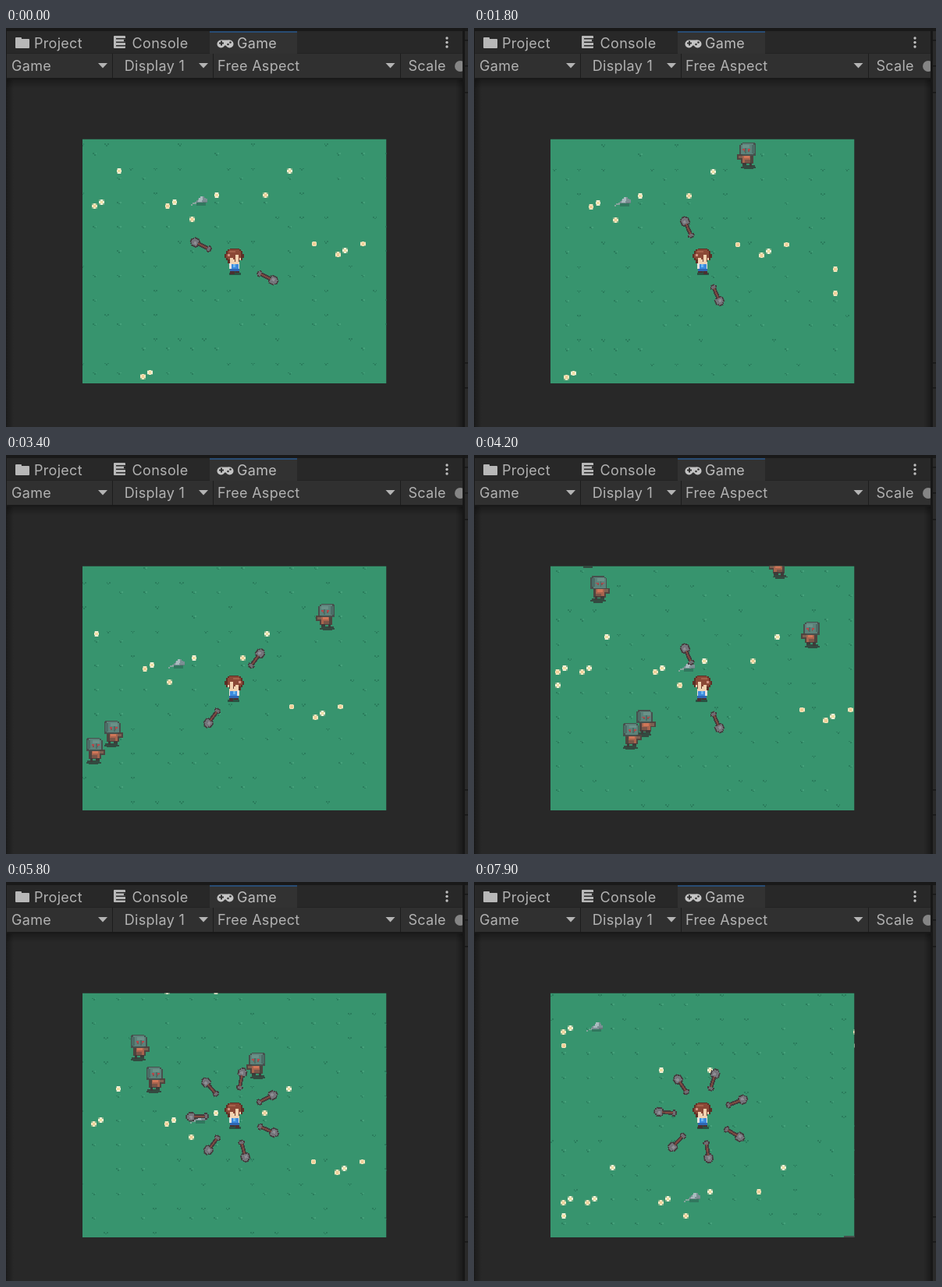
Animation, 592 px wide and 512 px high, one loop 8 s. Source, as an HTML page with a canvas:

```html
<!DOCTYPE html>
<html lang="en">
<head>
<meta charset="utf-8">
<title>Game view</title>
<style>
html, body { margin: 0; width: 100%; height: 100%; overflow: hidden; background: #282828; }
canvas { display: block; }
</style>
</head>
<body>
<canvas id="stage" width="592" height="512"></canvas>
<script>
const ctx = document.getElementById('stage').getContext('2d');
const LOOP = 8000, STEP = 100;
const TILE = 31.25, PX = TILE / 18;
const VIEW = { x: 98, y: 142.5, w: 389.5, h: 313.5 };
const HERO = { x: 292.5, y: 300 };

// Offset of the ground on screen: time, x, y
const walk = [[0, 0, 0], [900, 0, 1], [1800, -57, 1], [3400, -29, 46], [4900, 72.5, 53.5],
  [5800, -1, 82], [6600, 31, 138], [7900, 32.5, 183]];

// Enemy paths in ground coordinates: time, x, y
const enemies = [
  [[600, 437, 116], [1800, 407, 163], [2900, 378, 206]],
  [[1800, 489, 106], [3400, 439, 162], [4900, 378.5, 197.5], [5400, 360, 210]],
  [[1800, 93, 327], [3400, 166, 312], [4300, 198, 292]],
  [[1800, 71, 355], [3400, 143, 334], [4750, 200, 295]],
  [[3400, 97, 50], [4900, 144.5, 101.5], [5800, 172, 131], [6400, 197, 145]],
  [[3400, 106, 97], [4900, 161.5, 144.5], [5800, 192, 172], [6250, 207, 180]],
  [[3400, 387, 61], [4900, 346.5, 118.5], [5800, 322, 154], [6000, 317, 162]],
  [[7600, 460, 298], [7900, 447.5, 288.5]]
];

const singles = ['4,5', '11,5', '8,6', '10,6', '7,7', '12,8', '14,8', '6,1', '8,1', '16,9', '16,10'];
const pairs = ['3,7', '6,7', '13,9', '5,14'];
const triples = ['2,7', '2,0', '14,0'];
const rocks = ['7,6', '3,-1'];

function along(keys, t) {
  let i = 1;
  while (i < keys.length - 1 && t > keys[i][0]) i++;
  const [t0, x0, y0] = keys[i - 1], [t1, x1, y1] = keys[i];
  const k = Math.min(1, Math.max(0, (t - t0) / (t1 - t0)));
  return { x: x0 + (x1 - x0) * k, y: y0 + (y1 - y0) * k };
}

function sprite(w, h, paint) {
  const c = document.createElement('canvas');
  c.width = w;
  c.height = h;
  const g = c.getContext('2d');
  paint((color, x, y, rw, rh) => {
    g.fillStyle = color;
    g.fillRect(x, y, rw, rh);
  });
  return c;
}

function stamp(img, x, y, flip = false, angle = 0) {
  ctx.save();
  ctx.translate(x, y);
  ctx.rotate(angle);
  ctx.scale(flip ? -PX : PX, PX);
  ctx.drawImage(img, -img.width / 2, -img.height / 2);
  ctx.restore();
}

const hero = [0, 1].map(step => sprite(14, 20, r => {
  const dark = '#5c2f26', hair = '#8b4836', skin = '#f2d2b0';
  r('rgba(38,66,56,.8)', 3, 18, 9, 2);
  r('rgba(38,66,56,.8)', 4, 17, 7, 1);
  r(dark, 4, 0, 7, 1);
  r(dark, 2, 1, 10, 1);
  r(dark, 1, 2, 12, 2);
  r(dark, 0, 4, 14, 3);
  r(dark, 1, 7, 12, 2);
  r(dark, 2, 9, 2, 2);
  r(hair, 3, 1, 8, 1);
  r(hair, 2, 2, 10, 2);
  r(hair, 1, 4, 11, 3);
  r(hair, 2, 7, 3, 1);
  r('#a5604a', 3, 2, 5, 1);
  r('#d08f80', 2, 4, 2, 2);
  r(skin, 4, 7, 8, 2);
  r(skin, 4, 9, 7, 3);
  r(skin, 8, 5, 2, 2);
  r(hair, 6, 6, 2, 2);
  r(hair, 10, 6, 1, 2);
  r('#6b3c33', 7, 8, 1, 2);
  r('#6b3c33', 10, 8, 1, 2);
  r('#e9e2de', 3, 11, 2, 4);
  r('#e9e2de', 10, 11, 1, 4);
  r('#3c8ade', 5, 12, 5, 5);
  r('#6cb6f0', 6, 12, 2, 2);
  r('#2f67b4', 4, 15, 7, 2);
  r('#4b3032', 4, 17, 3, step ? 1 : 2);
  r('#4b3032', 8, 17, 3, step ? 2 : 1);
}));

const zombie = [0, 1].map(step => sprite(15, 20, r => {
  const edge = '#46504d', skin = '#5c827a';
  r('rgba(52,66,59,.9)', 4, 17, 9, 1);
  r('rgba(52,66,59,.9)', 3, 18, 11, 1);
  r('rgba(52,66,59,.9)', 5, 19, 7, 1);
  r(edge, 4, 0, 9, 1);
  r(edge, 3, 1, 11, 1);
  r(edge, 2, 2, 12, 7);
  r(edge, 3, 9, 11, 1);
  r(skin, 4, 1, 8, 1);
  r(skin, 3, 2, 9, 7);
  r('#6a9188', 4, 2, 5, 2);
  r('#4b6d66', 11, 2, 2, 6);
  r('#4b6d66', 6, 4, 1, 4);
  r('#b8474a', 4, 5, 2, 1);
  r('#b8474a', 8, 5, 2, 1);
  r('#8b4f4c', 5, 6, 1, 1);
  r('#8b4f4c', 8, 6, 1, 1);
  r('#4f443f', 3, 10, 9, 6);
  r('#4f443f', 0, 8 + step, 4, 4);
  r('#7d6152', 1, 9 + step, 4, 2);
  r('#a8644e', 4, 10, 6, 5);
  r('#cf7658', 5, 10, 4, 2);
  r('#7b5548', 6, 13, 4, 2);
  r('#3d3b39', 4, 15, 3, step ? 2 : 3);
  r('#3d3b39', 9, 15, 2, step ? 3 : 2);
}));

const shovel = sprite(17, 7, r => {
  const edge = '#443c3e';
  r(edge, 0, 2, 3, 3);
  r(edge, 1, 1, 2, 5);
  r(edge, 3, 2, 8, 3);
  r(edge, 10, 1, 6, 5);
  r(edge, 11, 0, 4, 7);
  r(edge, 16, 2, 1, 3);
  r('#716d72', 1, 2, 2, 3);
  r('#82493f', 3, 3, 8, 1);
  r('#74747a', 11, 1, 4, 5);
  r('#74747a', 15, 2, 1, 3);
  r('#8e8e94', 12, 2, 2, 2);
});

const flower = [['#f3e6bf', '#f0cf98'], ['#f0f0d8', '#f0dfa4']].map(([petal, heart]) => sprite(4, 4, r => {
  r('#7fae86', 0, 0, 4, 4);
  r(petal, 0, 1, 4, 2);
  r(petal, 1, 0, 2, 4);
  r(heart, 1, 1, 2, 2);
}));

const rock = sprite(12, 8, r => {
  r('#31775e', 4, 6, 7, 2);
  r('#86a39c', 0, 7, 1, 1);
  r('#86a39c', 1, 6, 3, 1);
  r('#86a39c', 3, 5, 2, 1);
  r('#7a8f93', 4, 4, 8, 2);
  r('#7a8f93', 5, 3, 7, 1);
  r('#7a8f93', 6, 2, 5, 1);
  r('#7a8f93', 7, 1, 3, 1);
  r('#a9bbbe', 5, 4, 3, 1);
  r('#a9bbbe', 6, 2, 3, 2);
  r('#a9bbbe', 7, 1, 2, 1);
  r('#64777b', 9, 5, 3, 1);
});

const blades = ['#46a17b', '#2b7d5d'].map(tip => sprite(3, 2, r => {
  r('#2b7d5d', 0, 0, 1, 1);
  r('#2b7d5d', 1, 1, 1, 1);
  r(tip, 2, 0, 1, 1);
}));

function hash(i, j) {
  const v = Math.sin(i * 127.1 + j * 311.7) * 43758.5453;
  return v - Math.floor(v);
}

function drawTile(i, j, off) {
  const x = i * TILE + off.x, y = j * TILE + off.y, key = i + ',' + j;
  const triple = triples.includes(key), pair = triple || pairs.includes(key);
  const single = triple || singles.includes(key);
  if (single) stamp(flower[hash(j, i) > 0.5 ? 1 : 0], x + 20, y + 27);
  if (pair) {
    stamp(flower[1], x + 28.5, y + 4.5);
    stamp(flower[0], x + 19.5, y + 9.7);
  }
  if (rocks.includes(key)) stamp(rock, x + 28.5, y + 33.5);
  else if (!single && !pair) {
    if (hash(i, j) < 0.42) stamp(blades[1], x + 4, y + 25);
    else stamp(blades[0], x + 20, y + 5.75);
  }
}

function drawGround(off) {
  ctx.fillStyle = '#37946e';
  ctx.fillRect(VIEW.x, VIEW.y, VIEW.w, VIEW.h);
  const i0 = Math.floor((VIEW.x - off.x) / TILE) - 1, j0 = Math.floor((VIEW.y - off.y) / TILE) - 2;
  for (let j = j0; j < j0 + 14; j++)
    for (let i = i0; i < i0 + 16; i++) drawTile(i, j, off);
}

function spin(t) {
  const deg = t < 1800 ? 26 + t * 0.12256 : 246.6 + (t - 1800) * 0.15;
  return deg * Math.PI / 180;
}

function drawGame(t) {
  const off = along(walk, t);
  const step = Math.floor(t / 200) % 2;
  ctx.save();
  ctx.beginPath();
  ctx.rect(VIEW.x, VIEW.y, VIEW.w, VIEW.h);
  ctx.clip();
  ctx.imageSmoothingEnabled = false;
  drawGround(off);
  for (const path of enemies) {
    if (t < path[0][0] || t > path[path.length - 1][0]) continue;
    const p = along(path, t);
    const x = p.x + off.x;
    stamp(zombie[step], x, p.y + off.y, x < HERO.x);
  }
  const left = (t > 1850 && t < 4850) || (t > 5850 && t < 6750);
  const moving = t >= 900 && t < 7100;
  stamp(hero[moving ? step : 0], HERO.x, HERO.y, left);
  const count = t < 5350 ? 2 : 7;
  for (let n = 0; n < count; n++) {
    const a = spin(t) + n * 2 * Math.PI / count;
    stamp(shovel, HERO.x + 47.5 * Math.cos(a), HERO.y - 0.7 + 47.5 * Math.sin(a), false, a);
  }
  ctx.restore();
}

function box(color, x, y, w, h) {
  ctx.fillStyle = color;
  ctx.fillRect(x, y, w, h);
}

function round(color, x, y, w, h, r) {
  ctx.fillStyle = color;
  ctx.beginPath();
  ctx.roundRect(x, y, w, h, r);
  ctx.fill();
}

function dot(color, x, y, r) {
  ctx.fillStyle = color;
  ctx.beginPath();
  ctx.arc(x, y, r, 0, 7);
  ctx.fill();
}

function label(text, x, y, color = '#b2b2b2') {
  ctx.fillStyle = color;
  ctx.fillText(text, x, y);
}

function arrow(x) {
  ctx.fillStyle = '#b4b4b4';
  ctx.beginPath();
  ctx.moveTo(x - 6, 45);
  ctx.lineTo(x + 6, 45);
  ctx.lineTo(x, 51.5);
  ctx.fill();
}

function shade(x0, y0, x1, y1) {
  const g = ctx.createLinearGradient(x0, y0, x1, y1);
  g.addColorStop(0, 'rgba(0,0,0,.35)');
  g.addColorStop(1, 'rgba(0,0,0,0)');
  ctx.fillStyle = g;
  ctx.fillRect(0, 64, 586, 448);
}

function drawIcons() {
  const c = '#b8b8b8', pad = '#c4c4c4', hole = '#323232';
  round(c, 12, 12, 8, 5, 1);
  round(c, 12, 14, 18, 12, 1);
  round(c, 138, 10, 15, 16, 1);
  for (const y of [13, 17.5, 22]) box('#282828', 141, y, 12, 1.5);
  box('#282828', 151, 14.5, 2, 3);
  dot(pad, 275.5, 20.5, 5);
  dot(pad, 286.5, 20.5, 5);
  box(pad, 275.5, 15.5, 11, 7);
  box(hole, 273, 18.5, 6, 2);
  box(hole, 275, 16.5, 2, 6);
  dot(hole, 284.5, 21, 1.3);
  dot(hole, 287.5, 18.5, 1.3);
  for (const y of [13, 18.5, 24]) dot('#c0c0c0', 565, y, 1.7);
}

function drawPanel() {
  box('#282828', 0, 0, 592, 512);
  box('#191919', 0, 0, 592, 4);
  box('#323232', 261, 4, 112, 29);
  box('#284c74', 261, 4, 112, 2);
  box('#303030', 0, 33, 586, 31);
  box('#232323', 0, 32, 261, 1);
  box('#232323', 373, 32, 213, 1);
  shade(0, 64, 0, 78);
  shade(0, 0, 10, 0);
  shade(586, 0, 576, 0);
  box('#191919', 0, 64, 586, 2);
  for (const x of [136, 265, 505]) box('#1d1d1d', x, 33, 1, 31);
  box('#191919', 0, 4, 1, 508);

  ctx.font = '18px Inter, "Open Sans", sans-serif';
  ctx.letterSpacing = '0.3px';
  ctx.textBaseline = 'alphabetic';
  label('Project', 36, 26);
  label('Console', 161.6, 26);
  label('Game', 296, 26, '#bcbcbc');
  label('Game', 7, 55);
  label('Display 1', 151.8, 55);
  label('Free Aspect', 271, 55);
  label('Scale', 515.4, 55);
  [124, 253, 492.5].forEach(arrow);
  drawIcons();
  dot('#858585', 582, 49, 7);

  box('#171717', 585, 0, 3, 512);
  box('#292929', 588, 4, 4, 508);
  for (const y of [15, 48, 82, 429, 461]) box('#171717', 588, y, 4, 1.5);
}

function frame(now) {
  const t = Math.floor((now % LOOP) / STEP + 0.001) * STEP;
  drawPanel();
  drawGame(t);
  requestAnimationFrame(frame);
}

frame(0);
</script>
</body>
</html>
```
